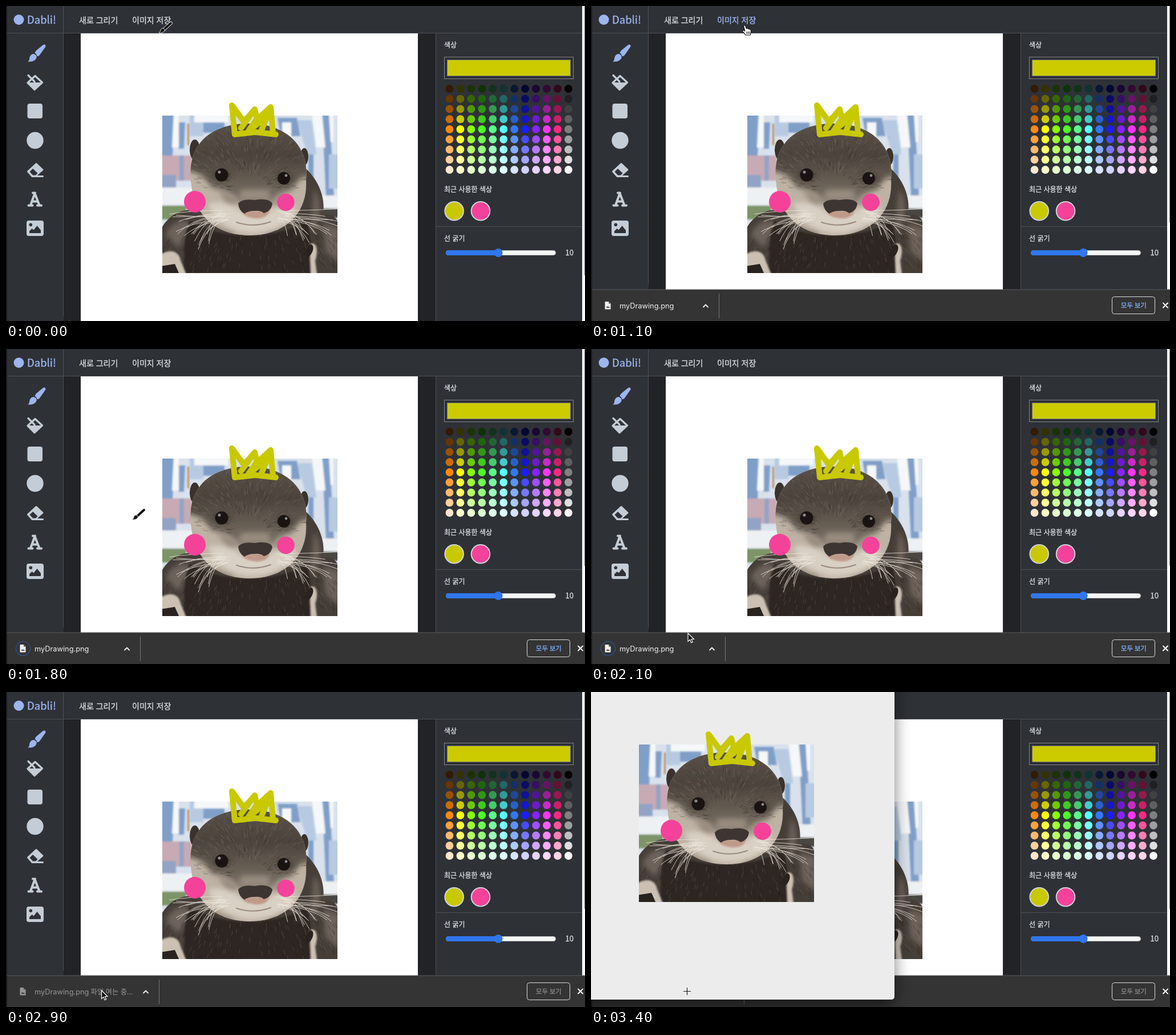
These frames come from a looping animation (1015 by 552 pixels, 4.1 s). An HTML page:

```html
<!DOCTYPE html>
<html lang="ko">
<head>
<meta charset="utf-8">
<title>Drawing app</title>
<style>
html, body { margin: 0; width: 100%; height: 100%; overflow: hidden; background: #1b1b1d; }
svg { display: block; width: 1015px; height: 552px; }
text { font-family: 'Noto Sans CJK KR', 'Noto Sans CJK', 'Noto Sans', sans-serif; white-space: pre; }
.latin { font-family: Inter, sans-serif; }
.line { fill: none; stroke-linecap: round; stroke-linejoin: round; }
.medium { fill: currentColor; stroke: currentColor; stroke-width: .35px; }
</style>
</head>
<body>
<svg viewBox="0 0 1015 552" xmlns="http://www.w3.org/2000/svg">
<defs>
  <clipPath id="photoClip"><rect x="274" y="192" width="307" height="276"/></clipPath>
  <clipPath id="headClip"><path id="headShape" d="M324 304C318 240 362 206 425 206S532 242 526 304C530 362 490 402 428 402S328 366 324 304Z"/></clipPath>
  <filter id="soft" x="-30%" y="-30%" width="160%" height="160%"><feGaussianBlur stdDeviation="5"/></filter>
  <filter id="hazy" x="-30%" y="-30%" width="160%" height="160%"><feGaussianBlur stdDeviation="1.5"/></filter>
  <filter id="shade" x="-20%" y="-20%" width="140%" height="140%"><feGaussianBlur stdDeviation="14"/></filter>
  <linearGradient id="fur" x1="0" y1="0" x2="0" y2="1">
    <stop offset="0" stop-color="#5c544c"/><stop offset=".45" stop-color="#4b433b"/><stop offset="1" stop-color="#7d7368"/>
  </linearGradient>
  <linearGradient id="toolbar" x1="0" y1="0" x2="0" y2="1">
    <stop offset="0" stop-color="#e4e4e4"/><stop offset="1" stop-color="#c9c9c9"/>
  </linearGradient>

  <g id="art">
    <g clip-path="url(#photoClip)">
      <rect x="274" y="192" width="307" height="276" fill="#d9e1ec"/>
      <g filter="url(#hazy)">
        <path fill="#7f9fc8" d="M270 188h26l-4 74h-22zM302 204h12l-2 46h-10zM345 200h38v22h-38zM476 196h34l6 32h-34zM554 188h13l8 146h-14zM530 246h9v70h-9z"/>
        <path fill="#b7cae2" d="M322 188h24v40h-24zM510 200h26l8 60h-16zM566 260h18v60h-18z"/>
        <path fill="#f5f7f9" d="M294 188h9v60h-12zM330 190h60v14h-60zM484 204h16v26h-16zM536 188h18l6 60h-16zM566 188h8v50h-5z"/>
        <path fill="#b98a5a" d="M318 206h3v38h-3z"/>
        <path fill="#c7aab4" d="M270 262h56v44h-56z"/>
        <path fill="#93a3c5" d="M270 296h28v22h-28zM304 262h8v44h-8z"/>
        <path fill="#eef1f3" d="M270 318h62v30h-62zM540 332h45v22h-45z"/>
        <path fill="#7d9468" d="M270 350h46v24h-46z"/>
        <path fill="#4a4743" d="M540 355h45v16h-45z"/>
      </g>
      <path fill="#453e38" d="M270 394C288 358 322 350 350 364L508 272C546 294 562 336 555 366C572 362 580 372 585 384V470H270Z"/>
      <path fill="#6d645b" filter="url(#soft)" d="M540 320C556 340 552 380 534 396ZM280 400C292 376 314 370 326 384L302 424ZM556 380L585 390V450L560 430Z"/>
      <path fill="#2d2723" filter="url(#hazy)" d="M322 376C380 412 470 410 526 378C542 410 530 450 538 470H310C316 440 308 410 322 376Z"/>
      <g id="coat" class="line" stroke-width="1"/>
      <path fill="#cbc0b2" filter="url(#hazy)" d="M270 436C288 424 304 430 306 446L316 470H302L292 456L270 458ZM532 418C545 410 548 430 542 446L545 470H534Z"/>
      <path fill="#29231f" d="M532 418C542 416 540 432 530 440L520 436ZM270 456L296 452L304 470H270Z"/>
      <ellipse cx="331" cy="252" rx="9" ry="18" fill="#39322d"/>
      <ellipse cx="523" cy="264" rx="7" ry="15" fill="#39322d"/>
      <use href="#headShape" fill="#bdb2a3"/>
      <g clip-path="url(#headClip)">
        <path fill="#8f8477" filter="url(#soft)" d="M326 360Q360 390 400 396L392 416H316ZM524 360Q500 392 456 398L470 416H540Z"/>
        <path fill="url(#fur)" filter="url(#soft)" d="M314 290C326 200 380 196 426 196S530 220 536 300C518 296 512 306 502 322C484 326 474 334 468 344H406C396 330 380 322 360 318C352 304 338 288 314 290Z"/>
        <path fill="#988c7f" filter="url(#soft)" d="M372 322Q398 326 408 342L390 356ZM482 326L466 346L488 352ZM412 322H460L464 340H408Z"/>
        <path fill="#d9d0c4" filter="url(#soft)" d="M354 346Q394 340 412 362H458Q490 342 508 352Q492 396 428 398Q370 392 354 346Z"/>
        <path fill="#352d27" opacity=".6" filter="url(#soft)" d="M360 298Q378 276 396 298Q380 314 360 298ZM468 302Q488 282 506 304Q488 318 468 302Z"/>
        <g id="hairs" class="line" stroke-width="1"/>
      </g>
      <circle cx="378" cy="296" r="11.5" fill="#191412"/><circle cx="374" cy="291" r="2.6" fill="#8f8b88"/>
      <circle cx="487" cy="302" r="11" fill="#191412"/><circle cx="491" cy="297" r="2.4" fill="#8f8b88"/>
      <path fill="#bf9a89" filter="url(#hazy)" d="M414 359H462Q457 374 436 372T414 359Z"/>
      <path fill="#3d3532" d="M407 346Q414 337 436 340Q460 336 467 346Q465 360 452 363Q446 358 436 359Q424 359 418 364Q408 358 407 346Z"/>
      <path class="line" stroke="#9a8b80" stroke-width="2" d="M404 379Q434 389 464 378"/>
      <g id="whiskers" class="line" stroke="#eee7dc" stroke-width="1" opacity=".8"/>
    </g>
    <path class="line" stroke="#c9c900" stroke-width="10" d="M396 174L401 225M397 175L417 203L436 181L412 214M436 181L440 197L425 219L449 200M441 198L464 177L468 222M463 182L448 217M401 225L437 221L473 225"/>
    <circle cx="331" cy="343" r="19" fill="#f4429a"/>
    <circle cx="490.500" cy="344" r="15.300" fill="#f4429a"/>
  </g>

  <g id="arrow"><path fill="#111" stroke="#fff" stroke-width="1.200" d="M0 0V14.500L3.400 11.400L5.800 16.800L8.200 15.700L5.900 10.500H10.400Z"/></g>
  <g id="hand"><path fill="#fff" stroke="#111" stroke-width="1.200" stroke-linejoin="round" d="M-4 -6Q-2.500 -8.500 -.7 -6L1 -1.500Q3 -3 4 -.8Q6 -2 6.800 .2Q9 -.4 9 2V5Q8.500 8 7.500 10H-.5Q-2 7-6 3.500Q-6.500 1-3.500 2L-1.800 3Z"/><path class="line" stroke="#111" d="M1.500 4V7.500M4 4V7.500M6.400 4V7.500"/></g>
  <g id="brush"><path class="line" stroke="#fff" stroke-width="5.600" d="M10 -8L-2 3"/><path class="line" stroke="#111" stroke-width="4" d="M10 -8L-1 2"/><path fill="#111" stroke="#fff" stroke-width=".8" d="M-3 1Q1 4-2 7Q-6 10-11 9Q-8 7-8 4Q-6 0-3 1Z"/></g>
  <g id="cross"><path stroke="#fff" stroke-width="3" opacity=".7" d="M-6 0H7M.5 -6.500V6.500"/><path stroke="#111" stroke-width="1.200" d="M-6 0H7M.5 -6.500V6.500"/></g>
</defs>

<rect width="1015" height="552" fill="#1b1b1d"/>
<rect x="2" width="1008" height="552" fill="#2e3136"/>
<rect x="101" y="48" width="652" height="504" fill="#222327"/>
<rect x="131" y="48" width="591" height="504" fill="#fff"/>
<rect x="1010" width="5" height="552" fill="#fafafa"/>
<rect id="thumb" x="1014" width="1" height="472" fill="#777"/>
<path stroke="#4d5056" d="M2 47.500H1010M753.500 48V552M754 386.500H1010M100.500 0V48"/>
<path id="sideLine" stroke="#4d5056" d="M100.500 48V544"/>

<circle cx="22.500" cy="24" r="9" fill="#9db5ee"/>
<text class="medium" x="37" y="30.500" font-size="18.500" color="#9db5ee">Dabli!</text>
<g class="medium" font-size="14" color="#d6dae0">
  <text x="128" y="30">새로 그리기</text><text id="save" class="medium" x="221" y="30">이미지 저장</text>
</g>

<g fill="#9db5ee">
  <path d="M64.500 68.500Q69.500 65.500 69.500 71L59 86Q56.500 89 54 87.500Q54 84.500 50.500 82.500Q51 80 53 78Z"/>
  <path d="M49 84Q54.500 86 53.500 91Q50 98.500 38 97.500Q41 95.500 41 92Q42.500 83.500 49 84Z"/>
</g>
<g fill="#c4cdd6" stroke-linejoin="round">
  <path fill="none" stroke="#c4cdd6" stroke-width="3.200" stroke-linecap="round" d="M51 122.500L63.500 134L50 146.500L38 134.500ZM39 121.500L50 132.500"/>
  <path d="M38 134H63.500L50 147Z"/>
  <rect x="37.500" y="171" width="26.500" height="26" rx="4"/>
  <circle cx="51" cy="235.500" r="14.700"/>
  <path stroke="#c4cdd6" stroke-width="3" d="M38.500 290L53 276.500L64 287L51 298.500H46Z"/>
  <path fill="#2e3136" d="M41.500 290.500L47 285L55.500 293L52 296.500H47Z"/>
  <rect x="45" y="297" width="21" height="3" rx="1.500"/>
  <path class="line" stroke="#c4cdd6" stroke-width="4" d="M43 349L50.500 328.500L58.500 349M46 342.500H55.500M39.500 349.500H46.500M55 349.500H62M47 327.500H51"/>
  <rect x="36" y="376" width="30" height="27" rx="4"/>
  <path fill="#2e3136" d="M41 398V394.500L45.500 390L48.500 392.500L54.500 385L61 393V398Z"/>
  <circle cx="43.300" cy="383.300" r="2.800" fill="#2e3136"/>
</g>

<g class="medium" font-size="12" color="#d6dae0">
  <text x="768" y="73">색상</text><text x="768" y="326">최근 사용한 색상</text><text x="768" y="412">선 굵기</text>
  <text x="980.500" y="437" font-size="13">10</text>
</g>
<rect x="768.500" y="89.500" width="226" height="38" fill="#2c2f34" stroke="#85878b"/>
<rect x="773.500" y="94.500" width="216" height="28" fill="#cbcb00" stroke="#777"/>
<g id="palette"></g>
<g stroke="#d0d3d8" stroke-width="2"><circle cx="785.700" cy="359.300" r="16.300" fill="#c9c900"/><circle cx="832" cy="359.300" r="16.300" fill="#f4429a"/></g>
<rect x="771.500" y="428.500" width="192" height="8" rx="4" fill="#f4f5f5" stroke="#b9bbbd"/>
<rect x="771" y="428" width="92" height="9" rx="4.500" fill="#2f76ee"/>
<circle cx="863" cy="432.500" r="7.500" fill="#2f76ee"/>

<use href="#art"/>

<g id="shelf">
  <rect x="2" y="497" width="1013" height="55" fill="#343434"/>
  <path stroke="#5a5a5a" d="M2 497H1015"/>
  <circle id="ring" cx="30" cy="525" r="12.500" fill="none" stroke="#2d5184" stroke-width="1.500"/>
  <g id="file">
    <path fill="#f1f1f1" d="M24.500 518H31L34.500 521.500V531.500H24.500Z"/>
    <path fill="#555" d="M26.500 529L28.500 525.500L30 527.500L31.200 526L32.800 529ZM31 518V521.500H34.500Z"/>
    <text class="latin" x="50" y="530" font-size="12.800" fill="#f1f1f1">myDrawing.png</text>
  </g>
  <text id="opening" x="148.500" y="530" font-size="12.300" fill="#999">파일 여는 중...</text>
  <g id="itemEnd"><path class="line" stroke="#f1f1f1" stroke-width="1.800" d="M-27 527.500L-23 523.500L-19 527.500"/><path stroke="#777" d="M.5 504V547"/></g>
  <rect x="913.500" y="509.500" width="75" height="30" rx="4" fill="none" stroke="#dcdcdc"/>
  <text id="showAll" class="medium" x="929" y="528.500" font-size="11.300">모두 보기</text>
  <path class="line" stroke="#fff" stroke-width="2" d="M1003 520.500L1011 528.500M1011 520.500L1003 528.500"/>
</g>

<g id="viewer">
  <rect x="-58" y="-98" width="590" height="650" rx="8" fill="#000" opacity=".5" filter="url(#shade)"/>
  <rect x="-58" y="-118" width="590" height="657" rx="5" fill="#ececec"/>
  <rect x="-58" y="-118" width="590" height="66" rx="5" fill="url(#toolbar)"/>
  <path stroke="#aaa" d="M-58 -51.500H532"/>
  <g id="tools"></g>
  <use href="#art" x="-190" y="-100"/>
</g>
<use id="cursor"/>
</svg>

<script>
const $ = id => document.getElementById(id);
const LOOP = 4100, STEP = 100;

let seed = 7;
const rand = () => (seed = seed * 16807 % 2147483647) / 2147483647;
const repeat = (n, make) => Array.from({ length: n }, (_, i) => make(i)).join('');

// Swatches: each hue runs from dark through pure to pale, the last column is grey.
const hues = [[255,136,8], [255,255,0], [136,255,0], [76,255,34], [85,255,136], [85,255,255],
  [51,119,255], [28,28,255], [136,34,255], [255,51,255], [255,40,130]];
$('palette').innerHTML = repeat(12, col => repeat(9, row => {
  const shade = v => row < 5 ? v * (row + 1) / 5 : v + (255 - v) * (row - 4) / 5;
  const rgb = col < 11 ? hues[col].map(shade) : Array(3).fill(255 * row / 8);
  return `<circle cx="${777.5 + col * 18.95}" cy="${145 + row * 17.75}" r="6.9" fill="rgb(${rgb.map(Math.round)})"/>`;
}));

// Head fur fans out from the nose bridge, the coat hangs down, whiskers droop from both cheeks.
$('hairs').innerHTML = repeat(380, () => {
  const a = -Math.PI * (0.02 + 0.96 * rand()), r = 35 + 105 * rand();
  const x = 427 + Math.cos(a) * r * 0.8, y = 325 + Math.sin(a) * r * 0.9;
  return `<path stroke="${rand() < 0.55 ? '#332c26' : '#8a8075'}" opacity=".4" d="M${x} ${y}l${Math.cos(a) * 7} ${Math.sin(a) * 7}"/>`;
});
$('coat').innerHTML = repeat(220, () => {
  const x = 278 + 300 * rand(), y = 392 + 72 * rand();
  return `<path stroke="${rand() < 0.5 ? '#1f1a17' : '#6f665d'}" opacity=".4" d="M${x} ${y}l${(x - 428) * 0.03} 7"/>`;
});
$('whiskers').innerHTML = [-1, 1].map(side => repeat(19, i => {
  const a = -0.05 + i * 0.072, len = 78 + 35 * rand() - i * 2;
  const x = 432 + side * (38 + 22 * rand()), y = 358 + 20 * rand();
  const dx = side * len * Math.cos(a), dy = len * Math.sin(a) * 0.75;
  return `<path d="M${x} ${y}q${dx * 0.65} ${dy * 0.15} ${dx} ${dy}"/>`;
})).join('');

// Viewer toolbar: [left, width, icon path around the button centre]
const buttons = [
  [-49, 33, 'M-9 -5H3V5H-9ZM-5 -5V5M7 -1L10 2L13 -1'],
  [-5, 33, 'M-5 -1A4 4 0 1 1 3 -1A4 4 0 1 1 -5 -1M2 2L6 6M-3 -1H1'],
  [33, 33, 'M-5 -1A4 4 0 1 1 3 -1A4 4 0 1 1 -5 -1M2 2L6 6M-3 -1H1M-1 -3V1'],
  [78, 33, 'M-3 -2H-5V6H5V-2H3M0 2V-7M-3 -4L0 -7L3 -4'],
  [147, 51, 'M-14 5L-4 -5M-12 5L-3 -4M13 -1L16 2L19 -1M8 -10V10'],
  [206, 31, 'M-5 -2V6H5V-2ZM-3 -5H3L5 -3M-1 -7L-3 -5L-1 -3'],
  [248, 33, 'M-6 0A6 6 0 1 1 6 0A6 6 0 1 1 -6 0M-2 3L0 -3L2 3'],
  [291, 233, 'M-108 -1A3 3 0 1 1 -102 -1A3 3 0 1 1 -108 -1M-103 2L-100 5']
];
$('tools').innerHTML = buttons.map(([x, w, icon]) =>
  `<rect x="${x}" y="-80" width="${w}" height="20" rx="4" fill="#fafafa" stroke="#bbb"/>
   <path class="line" stroke="#555" stroke-width="1.3" transform="translate(${x + w / 2} -70)" d="${icon}"/>`).join('') +
  '<text x="313" y="-66" font-size="11" fill="#888">검색</text>';

// [time, x, y]
const path = [[0, 279, 38], [300, 275, 38], [500, 268, 39], [800, 265, 38], [1000, 265, 38],
  [1400, 291, 50], [1600, 284, 84], [1800, 232, 290], [2000, 179, 476], [2100, 170, 498],
  [2400, 167.5, 523], [LOOP, 167.5, 523]];
const zoom = [[3000, 0], [3100, 0.42], [3200, 0.72], [3300, 0.93], [3400, 1], [LOOP, 1]];

function at(keys, t, k = 1) {
  if (t <= keys[0][0]) return keys[0][k];
  const i = keys.findIndex(key => key[0] >= t);
  const a = keys[i - 1], b = keys[i];
  return a[k] + (b[k] - a[k]) * (t - a[0]) / (b[0] - a[0]);
}
const show = (id, on) => $(id).style.display = on ? '' : 'none';

function draw(t) {
  const shelf = t >= 900, ring = t >= 1700 && t < 2600, opening = t >= 2700;
  show('shelf', shelf);
  $('sideLine').setAttribute('d', `M100.5 48V${shelf ? 488 : 544}`);
  $('thumb').setAttribute('height', shelf ? 380 : 472);
  $('save').style.color = t >= 500 && t < 1600 ? '#9db5ee' : '#d6dae0';

  show('ring', ring);
  show('opening', opening);
  $('file').setAttribute('opacity', opening ? 0.52 : 1);
  $('itemEnd').setAttribute('transform', `translate(${opening ? 268 : ring ? 235 : 224} 0)`);
  $('showAll').style.color = opening ? '#858585' : '#7baaf2';

  const s = at(zoom, t);
  show('viewer', s > 0);
  $('viewer').setAttribute('opacity', s);
  $('viewer').setAttribute('transform', `translate(${234 * (1 - s)} ${212 * (1 - s)}) scale(${s})`);

  const kind = t < 500 ? 'brush' : t < 1600 ? 'hand' : t < 2100 ? 'brush' : t < 3400 ? 'arrow' : 'cross';
  $('cursor').setAttribute('href', '#' + kind);
  $('cursor').setAttribute('transform', kind === 'cross' ? 'translate(168 524.5)'
    : `translate(${at(path, t, 1)} ${at(path, t, 2)})`);
}

const start = performance.now();
function tick() {
  const t = (performance.now() - start) % LOOP;
  draw(Math.floor(t / STEP) * STEP);
  requestAnimationFrame(tick);
}
tick();
</script>
</body>
</html>
```
